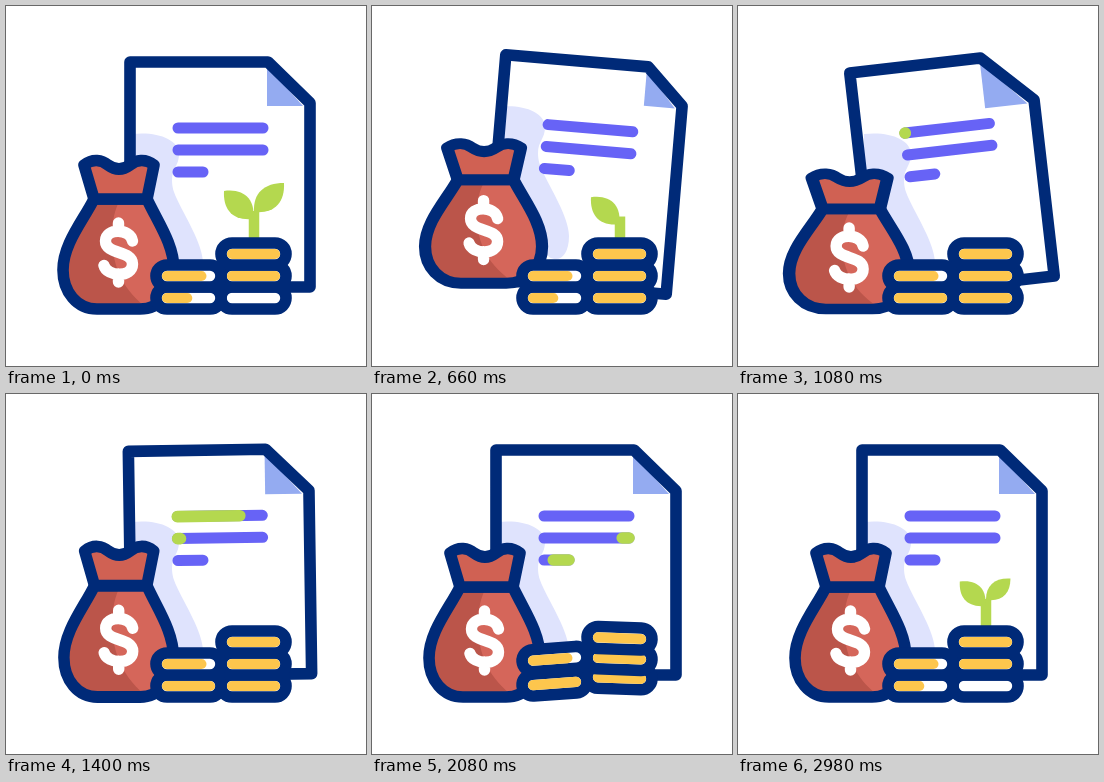
These frames come from a looping animation (360x360 px, 3 s). An HTML page:

```html
<!DOCTYPE html>
<html lang="en">
<head>
<meta charset="utf-8">
<title>Growing investment</title>
<style>
  html, body { margin: 0; width: 100%; height: 100%; overflow: hidden; background: #fff; }
  svg { display: block; width: 100%; height: 100%; }
  .ink { stroke: #002a78; stroke-width: 11.6; }
  .line { stroke: #6763f6; stroke-width: 11; }
  .mark { stroke: #b4d84f; stroke-width: 11.6; }
  .gold { stroke: #fdc64d; stroke-width: 10.2; }
</style>
</head>
<body>
<svg viewBox="0 0 360 360" fill="none" stroke-linecap="round" stroke-linejoin="round">
  <path id="shadow" fill="#dfe3fd" d="M126 128C150 125 173 133 173 148C173 160 166 162 166 174C166 182 168 186 170 191C178 209 197 238 197 257C197 277 187 284 177 278L126 190Z"/>
  <g id="paper">
    <path id="fold" fill="#94abf1"/>
    <path id="sheet" class="ink"/>
    <g id="lines"></g>
  </g>
  <g id="bag">
    <path fill="#d5665a" d="M88 193C77 215 57 238 57 264C57 286 71 303 91 303H134C154 303 168 286 168 264C168 238 151 215 141 193Z"/>
    <path fill="#bb554a" d="M88 193C77 215 57 238 57 264C57 286 71 303 91 303H142C118 285 106 262 106 230C106 214 109 204 114 193Z"/>
    <path class="ink" d="M88 193C77 215 57 238 57 264C57 286 71 303 91 303H134C154 303 168 286 168 264C168 238 151 215 141 193Z"/>
    <path class="ink" fill="#d06153" d="M88 193L78 159C87 152 96 154 102 159Q113 167 124 159C130 154 139 152 148 159L141 193Z"/>
  </g>
  <path id="dollar" stroke="#fff" stroke-width="11.4" d="M126.500 235C124 222 99.500 222 99.500 235C99.500 249 126.500 244 126.500 258C126.500 272 101 271 98 259.500M112.500 217V225M112.500 268V276"/>
  <g id="plant" fill="#b4d84f">
    <path id="stem" fill="none" stroke="#b4d84f" stroke-width="10.5" stroke-linecap="butt"/>
    <path id="leafL" d="M-1 8C-22 10 -31 -2 -30 -20C-10 -23 2 -11 -1 8Z"/>
    <path id="leafR" d="M0 1C-1 -18 10 -28 30 -28C31 -8 20 3 0 1Z"/>
  </g>
  <g id="coins"></g>
</svg>
<script>
const LOOP = 3000;
const $ = id => document.getElementById(id);
const clamp = v => Math.min(1, Math.max(0, v));
const sine = p => (1 - Math.cos(Math.PI * p)) / 2;
const ramp = (t, from, to) => clamp((t - from) / (to - from));
const ease = (t, from, to) => sine(ramp(t, from, to));
const place = (node, value) => node.setAttribute('transform', value);

function add(parent, tag, attrs) {
  const node = document.createElementNS('http://www.w3.org/2000/svg', tag);
  for (const name in attrs) node.setAttribute(name, attrs[name]);
  return parent.appendChild(node);
}

// Eased value through [time, value] keys
function track(t, keys) {
  let [t0, v0] = keys[0];
  for (const [t1, v1] of keys) {
    if (t < t1) return v0 + (v1 - v0) * ease(t, t0, t1);
    [t0, v0] = [t1, v1];
  }
  return v0;
}

const PAPER_TILT = [[360, 0], [700, 5], [1100, -6.6], [1610, 2.4], [1980, 0]];
const BAG_SQUASH = [[0, 0], [220, .09], [450, -.03], [660, .06], [840, -.02], [1080, .09], [1340, -.02], [1600, .03], [1900, 0]];
const BAG_LIFT = [[260, 0], [640, 26], [1000, 0]];

const lines = [
  { y: 122, x2: 257, head: [1060, 1580], tail: [1460, 1930] },
  { y: 144, x2: 257, head: [1340, 1860], tail: [1590, 2190] },
  { y: 166, x2: 197, head: [1600, 2050], tail: [1910, 2320] }
].map(line => {
  const d = `M172 ${line.y}H${line.x2}`;
  add($('lines'), 'path', { class: 'line', d });
  line.mark = add($('lines'), 'path', { class: 'mark' });
  return line;
});

// Share of a coin face covered in gold, dipping to `low` around the loop point
const dip = (t, low, off, on) => low + (1 - low) * (t < LOOP / 2 ? ramp(t, on, on + 200) : 1 - ramp(t, off, off + 200));
const COIN_WIDTH = 65;
const coins = [
  { x: 215, y: 292, start: 1540, lift: 11, full: t => dip(t, 0, 2340, 300) },
  { x: 215, y: 270, start: 1480, lift: 11, full: () => 1 },
  { x: 215, y: 248, start: 1440, lift: 11, full: () => 1 },
  { x: 150, y: 292, start: 1930, lift: 8, full: t => dip(t, .47, 2650, 700) },
  { x: 150, y: 270, start: 1850, lift: 8, full: () => .8 }
].map(coin => {
  const { x, y } = coin;
  coin.node = add($('coins'), 'g', {});
  add(coin.node, 'rect', { class: 'ink', x, y: y - 11, width: COIN_WIDTH, height: 22, rx: 11, fill: '#fff' });
  coin.gold = add(coin.node, 'path', { class: 'gold' });
  return coin;
});

// The turned corner grows as the sheet leans left
function drawPaper(t) {
  const tilt = track(t, PAPER_TILT);
  const cut = 42 - tilt;
  const left = 304 - cut, bottom = 55 + cut;
  place($('paper'), `rotate(${tilt} 214 168.5)`);
  $('sheet').setAttribute('d', `M124 56H${left}L304 ${bottom}V281H124Z`);
  $('fold').setAttribute('d', `M${left - 1} 60V${bottom + 3}H${304 - 7}Z`);
}

function drawLines(t) {
  for (const { y, x2, head, tail, mark } of lines) {
    const at = range => 172 + (x2 - 172) * ease(t, ...range);
    mark.style.display = t >= head[0] && t < tail[1] ? '' : 'none';
    mark.setAttribute('d', `M${at(tail)} ${y}H${at(head)}`);
  }
}

function drawBag(t) {
  const q = track(t, BAG_SQUASH), lift = track(t, BAG_LIFT);
  const sx = 1 + q * .9, sy = 1 - q;
  place($('bag'), `translate(130 ${303 - lift}) scale(${sx} ${sy}) translate(-130 -303)`);
  place($('dollar'), `translate(${17 * (1 - sx)} ${56 * (1 - sy) - lift})`);
  place($('shadow'), `translate(0 ${-lift * 1.05})`);
}

function drawPlant(t) {
  const early = t < LOOP / 2;
  const stage = (shrink, grow) => early ? 1 - ease(t, ...shrink) : ease(t, ...grow);
  const stem = stage([560, 960], [2400, 2760]);
  const left = stage([630, 900], [2420, 3150]);
  const right = stage([300, 620], [2500, 3200]);
  const top = 242 - 37 * stem;
  $('plant').style.display = stem > 0 ? '' : 'none';
  place($('plant'), `translate(248 ${top})`);
  $('stem').setAttribute('d', `M0 0V${Math.max(0, 250 - top)}`);
  place($('leafL'), `scale(${left})`);
  place($('leafR'), `rotate(${early ? 0 : 14 * (1 - right)}) scale(${right})`);
}

function drawCoins(t) {
  for (const { x, y, start, lift, full, node, gold } of coins) {
    const phase = ramp(t, start, start + 800);
    const wave = Math.sin(2 * Math.PI * phase);
    const tilt = wave > 0 ? -4.5 * wave : -2.2 * wave;
    const rise = lift * sine(2 * phase);
    place(node, `translate(0 ${-rise}) rotate(${tilt} ${x + COIN_WIDTH / 2} ${y})`);
    const cover = full(t);
    gold.style.display = cover > 0 ? '' : 'none';
    gold.setAttribute('d', `M${x + 11} ${y}H${x + 11 + (COIN_WIDTH - 22) * cover}`);
  }
}

function draw(t) {
  drawPaper(t);
  drawLines(t);
  drawBag(t);
  drawPlant(t);
  drawCoins(t);
}

const begin = performance.now();
function tick() {
  draw((performance.now() - begin) % LOOP);
  requestAnimationFrame(tick);
}
tick();
</script>
</body>
</html>
```
